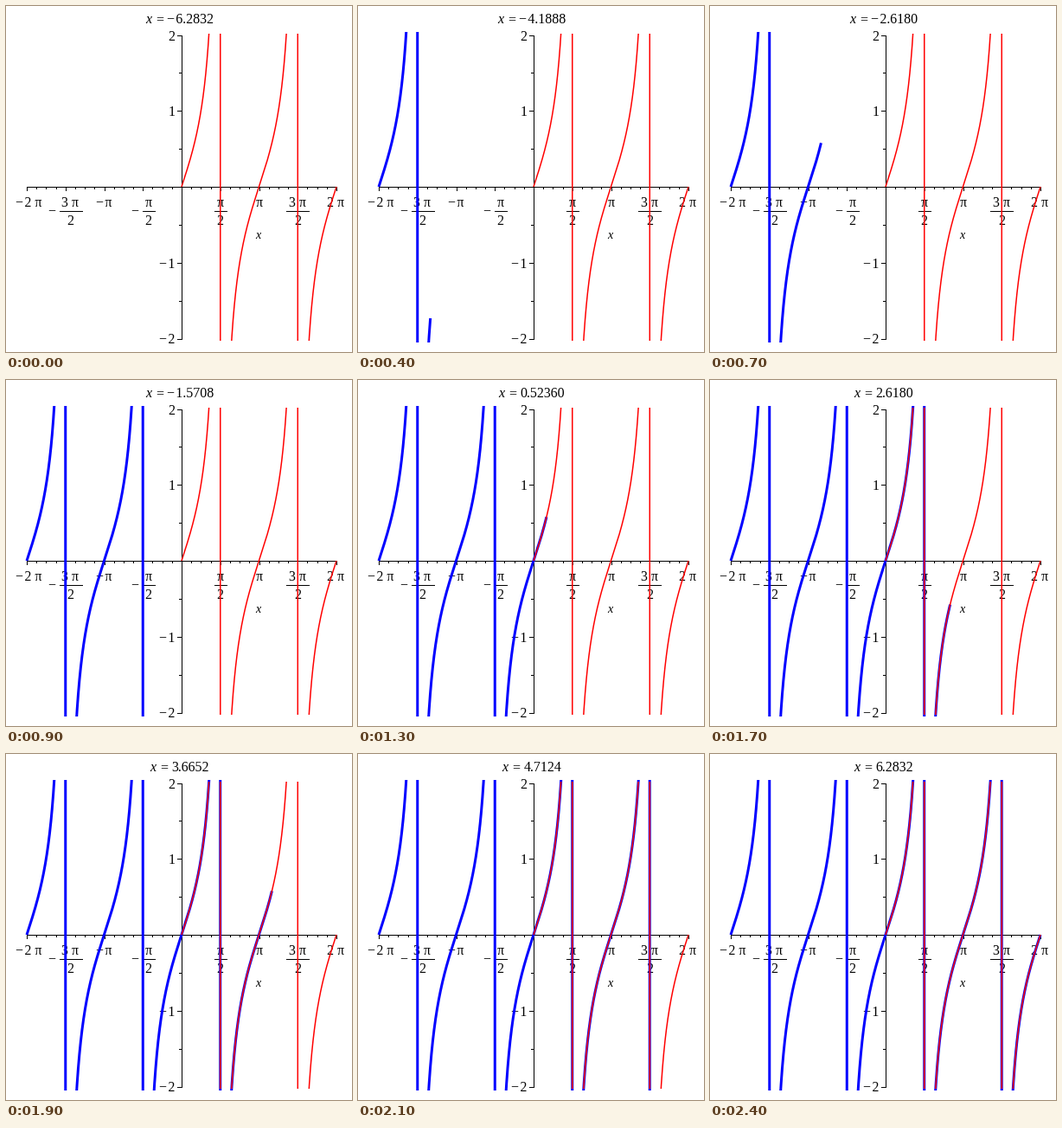
Animation of 400x400 px, one loop 2500 ms. Source, as a matplotlib script:

```python
import numpy as np
import matplotlib.pyplot as plt
from matplotlib.animation import FuncAnimation
from matplotlib.patches import Rectangle

DPI = 100
PX = 72 / DPI
FRAMES = 25
X0, Y0 = 203, 209                # plot centre in pixels
UNIT_X, UNIT_Y = 179 / (2 * np.pi), 87.75
EM = 16
MINUS = "\u2212\u200a"           # minus with a hair space
PI = "\u03c0"

plt.rcParams["font.family"] = ["Liberation Serif", "DejaVu Serif"]
fig = plt.figure(figsize=(4, 4), dpi=DPI, facecolor="white")
ax = fig.add_axes([0, 0, 1, 1])
ax.set_xlim(0, 400)
ax.set_ylim(400, 0)
ax.axis("off")


def px(u):
    return X0 + UNIT_X * u


def py(v):
    return Y0 - UNIT_Y * v


def label(x, y, s, ha="center", size=EM, **kw):
    return ax.text(x, y, s, ha=ha, va="baseline", fontsize=size * PX, **kw)


def segment(x, y):
    # snapped to whole pixels, both ends included
    ax.plot(x, y, color="black", lw=PX, solid_capstyle="projecting",
            snap=True, zorder=1)


def fraction(x, top, half):
    label(x, 232, top)
    segment([x - half, x + half], [237, 237])
    label(x, 253, "2")


def tan_points(start, stop, n):
    # the jump across each pole draws the vertical line
    u = np.linspace(start, stop, n)
    return px(u), py(np.clip(np.tan(u), -4, 4))


def curve(color, width, top, bottom, zorder):
    line, = ax.plot([], [], color=color, lw=width * PX, zorder=zorder,
                    solid_capstyle="butt")
    line.set_clip_path(Rectangle((0, top), 400, bottom - top,
                                 transform=ax.transData))
    return line


# axes and ticks
segment([24, 382], [Y0, Y0])
segment([X0, X0], [34, 385])
for i in range(-16, 17):
    x = px(i * np.pi / 8)
    segment([x, x], [210, 213 if i % 4 == 0 else 211])
for i in range(-4, 5):
    y = py(i / 2)
    segment([198 if i % 2 == 0 else 200, 202], [y, y])

# tick labels
for v in (-2, -1, 1, 2):
    label(195.5, py(v) + 6, f"{MINUS if v < 0 else ''}{abs(v)}", ha="right")
label(26, 232, f"{MINUS}2 {PI}")
label(113.5, 232, f"{MINUS}{PI}")
label(293, 232, PI)
label(381.5, 232, f"2 {PI}")
fraction(74.5, f"3 {PI}", 13)
label(54.5, 242, MINUS)
fraction(164.5, PI, 7)
label(150.5, 242, MINUS)
fraction(247.5, PI, 7)
fraction(337, f"3 {PI}", 13)
label(291.5, 269, "x", size=14, style="italic")

trace = curve("#0000ff", 3, 30, 389, 4)
graph = curve("#ff0000", 1.5, 32, 387, 5)
graph.set_data(*tan_points(0, 2 * np.pi, 4001))

name = label(0, 20, "x", ha="left", style="italic")
equals = label(0, 20, "=", ha="left")
number = label(0, 20, "", ha="left")


def five_digits(v):
    if v == 0:
        return "0."
    s = f"{abs(v):.{5 if abs(v) < 1 else 4}f}"
    return MINUS + s if v < 0 else s


def update(k):
    v = (k - 12) * np.pi / 6
    if k:
        trace.set_data(*tan_points(-2 * np.pi, v + 1e-4, 300 * k + 2))
    else:
        trace.set_data([], [])

    s = five_digits(v)
    digits = sum(c.isdigit() for c in s)
    width = 25 + EM * (0.5 * digits + 0.25 + 0.68 * (v < 0))
    left = 201 - width / 2
    number.set_text(s)
    for part, dx in ((name, 0), (equals, 12), (number, 25)):
        part.set_x(left + dx)
    return trace, name, equals, number


anim = FuncAnimation(fig, update, frames=FRAMES, interval=100,
                     repeat=True, repeat_delay=0, blit=False)
plt.show()
```
